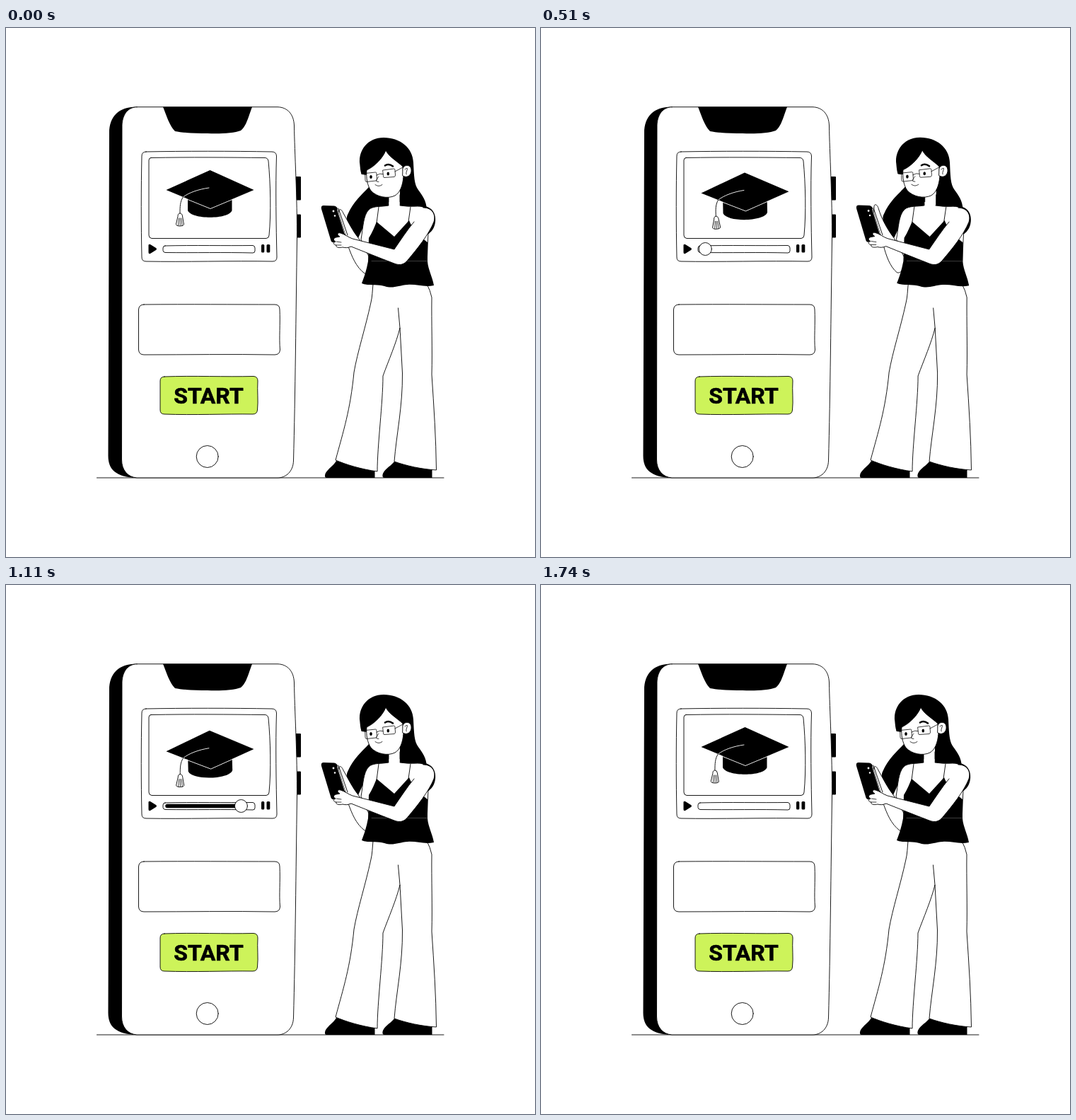
Write an HTML page that moves like this. It is 748 px wide and 748 px high and loops after 1770 ms.

```html
<!DOCTYPE html>
<html lang="en">
<head>
<meta charset="utf-8">
<title>Online course</title>
<style>
  html, body { margin: 0; width: 100%; height: 100%; overflow: hidden; background: #fff; }
  svg { display: block; width: 100vw; height: 100vh; }
  .ink { fill: #000; stroke: none; }
  .line { fill: none; }
  .fine { stroke-width: .75; }
  text { font: 700 32px Roboto, Arial, sans-serif; fill: #000; stroke-width: .6; text-anchor: middle; }
</style>
</head>
<body>
<svg viewBox="0 0 748 748" fill="#fff" stroke="#000" stroke-width=".9" stroke-linecap="round" stroke-linejoin="round">
  <path class="line" d="M128.500 636H619"/>

  <g id="device">
    <path class="ink" d="M185 111.500C160 111 146 125 146 148L144.500 605C144.500 624 155 635 185 636Z"/>
    <rect class="ink" x="409" y="210" width="8" height="33.500" rx="1"/>
    <rect class="ink" x="411" y="263.500" width="6" height="33" rx="1"/>
    <path d="M185 111.700H384C398 112 407 122 407.500 138C408 175 412 240 411.500 300C410 400 409 520 406.500 612C406 627 396 636 384 636H185C172 635 163.500 625 163.500 610L164 137C165 121 173 112 185 111.700Z"/>
    <path class="ink" d="M222 111.500H348L345 120C341 132 338 140 332 145C322 149 300 150 285 149C268 149 248 148 239 146C231 138 227 124 222 111.500Z"/>
    <path d="M198 175C250 174 320 174 376 175Q382 175 382.500 181C381 225 382 280 383 324Q383 330 377 330C320 329 250 331 198 330Q192 330 192 324C191 280 191 225 192 181Q192 175 198 175Z"/>
    <path d="M205 183.500C260 182.500 315 183 366 183.500Q370 183.500 371 188C374 220 375 262 372 293Q372 297 368 297.500H206Q202 297 202 293V187Q202 183.500 205 183.500Z"/>
    <path class="ink" d="M201.500 307Q202 305 204 306L212 311Q214 312.500 212 314L204 319Q201.500 320 201.500 317Z"/>
    <rect class="ink" x="361" y="306" width="4.300" height="11.500" rx="1.500"/>
    <rect class="ink" x="368.500" y="306" width="4.800" height="11.500" rx="1.500"/>
    <path d="M225 308C265 307 310 308 349 307.500Q352 308 352 311V315Q352 318 349 318C310 317 265 318 225 317.500Q222 317 222 314.500V311Q222 308 225 308Z"/>
    <path d="M195 391C260 390.500 320 391 380 391Q387 391 387 398C388 418 386 438 387.500 455Q387 462 380 462C320 461 255 462 195 462Q188 462 187.500 455V398Q188 391 195 391Z"/>
    <circle cx="284.700" cy="606" r="15.500"/>
  </g>

  <g id="progress">
    <path id="fill" class="line" stroke-width="5.500"/>
    <circle id="knob" cy="312.500"/>
  </g>

  <g id="cap">
    <path class="ink" d="M257 241V258C262 271 315 271 319.500 258V241Z"/>
    <path class="ink" d="M288.500 201L350.500 229L289 255L226.500 229Z"/>
    <path class="line" stroke="#fff" d="M257 242.500L289 255.500L320 242.500"/>
    <path class="line" stroke="#fff" d="M287 226C272 228 258 233 250.500 239"/>
    <g id="tassel">
      <path class="line" d="M250.500 239C246 245 246 253 246 262"/>
      <path d="M243 266Q243 262 246 262T249.500 266L251.500 278Q251 280 246 280T240.500 278Z"/>
      <path class="line fine" d="M244.500 269L243.500 279M246.200 269V279M248 269L249 279"/>
    </g>
  </g>

  <g id="button">
    <path fill="#cdf35a" d="M224 493C265 491.500 310 493.500 350 492.500Q356 493 356 499C355 513 357 527 355.500 540Q355 546 349 546C310 545.500 265 547.500 224 546Q218 546 218 540V499Q218 493 224 493Z"/>
    <text x="286.500" y="531">START</text>
  </g>

  <g id="legs">
    <path class="ink" d="M451 634C450 626 463 620 467 612L521.500 625V636H453Q451 636 451 634Z"/>
    <path class="ink" d="M532.500 634C532 625 544 620 549 613L602.500 623V636H535Q532.500 636 532.500 634Z"/>
    <path d="M519 362C518 372 518 380 516 388C508 425 497 458 492 487C487 540 477 570 466 611C480 617 502 624 525 627C525 590 533 530 533 492C541 470 552 445 557 424L560.500 488C561 535 552 575 549 613C566 619 588 624 608.500 625C608 580 605 535 602 490C603 455 601.500 415 602 381Q600 371 595 362Z"/>
    <path class="line" d="M554.500 396L557 424"/>
  </g>

  <g id="torso">
    <g id="head">
      <path class="ink" d="M534 155C512 155 499 172 500 190C501 198 501 203 503 207L514 208V224C505 234 492 244 484 262C480 269 482 274 486 282C489 288 492 292 498 297L514 262L545 270H575L595 256C594 244 589 237 583 229C577 221 577 209 576 190C575 169 557 155 534 155Z"/>
      <path stroke="none" d="M541 230V266H557V230Z"/>
      <path class="line" d="M541 236V252M557 236V252"/>
      <path d="M537 173C533 184 521 196 510 201C509 212 511 223 516 230C524 239 540 242 550 237C557 233 561 223 562 210L561 196C554 189 541 182 537 173Z"/>
      <path d="M561 199C562 193 572 192 573 200C574 208 567 213 561 209Z"/>
      <path class="line fine" d="M564 200Q569 196 567 201T566 207"/>
      <path class="line" stroke-width="2.600" d="M536 194.500Q541 191 547 195.500"/>
      <path class="line fine" d="M508 205.500L522.500 204Q524 204 524 206L524.500 214Q524.500 215.500 523 216L510 217.500Q508 217.500 508 215.500ZM533 201L548.500 199Q550 199 550 201L550.500 208Q550.500 210 549 210.500L535 211.500Q533.500 211.500 533.500 210ZM524 208Q529 205 533 206.500M550 203L562 196.500M502.500 206L508 207"/>
      <g class="eyes"><ellipse class="ink" cx="516" cy="210.500" rx="1.800" ry="2.600"/></g>
      <g class="eyes"><ellipse class="ink" cx="540.300" cy="206" rx="1.800" ry="2.600"/></g>
      <path class="line fine" d="M527 210C525 213 523 215 524 217L527 217.500M522 221.500Q527 225.500 532 221.500"/>
    </g>

    <path class="ink" d="M592 252C604 254 608 264 607 274C606 283 602 288 594 294Z"/>
    <path d="M541 251C532 253 519 251 513 257C505 265 505 282 502 299L516 335H595L596.500 300L598 268C598 256 592 252 582 252Q568 253 557 251"/>
    <path stroke="none" d="M541.600 246H556.500V255H541.600Z"/>
    <path class="line" d="M527 253L524 276M572 253L569 274"/>

    <path id="farArm"/>

    <path class="ink" d="M513 297C518 289 521 281 524 274L549 295L570 272C574 282 580 290 587 296L596 303V330C597 342 603 352 605 364C592 367 580 362 568 363C555 364 547 369 535 365C525 362 512 365 503 361C507 351 510 341 512 330Z"/>
    <path class="line" stroke="#444" d="M517 329.500H595"/>

    <g id="nearArm">
      <path class="line" d="M470 255L483 293"/>
      <path class="ink" d="M449 251L464 251.500Q468 252 469 256L480.500 293Q481 297 476 299L464 303Q460 304 459 299L446 256Q445 251 449 251Z"/>
      <path class="line fine" stroke="#fff" d="M468.500 257L479 291"/>
      <circle cx="463" cy="259" r="1.400" stroke="none"/>
      <circle cx="465" cy="265.500" r="1.200" stroke="none"/>
      <path d="M590 254C603 254 608 264 605 274C598 292 580 314 569 327C563 335 557 336 549 333C528 325 508 317 488 309C483 311 480 311 476 310C472 311 466 311 467 307C463 307 462 303 466 302C463 301 462 297 467 296L472 295C467 292 469 289 473 290C480 292 484 296 490 298L549 313C558 300 567 286 577 274"/>
      <path class="line fine" d="M467 302L474 303M467 307H474"/>
    </g>
  </g>
</svg>

<script>
const LOOP = 1770;
const $ = id => document.getElementById(id);
const eyes = [...document.querySelectorAll('.eyes')];
const eyeSpots = [[516, 210.5], [540.3, 206]];

const armLow = 'M468 272 C469 266 469 262 471 258 C472 255 475 257 477 262 C484 274 490 287 499 298 L516 328 C517 338 511 349 507 347 C495 338 489 323 484 309 Z';
const armHigh = 'M470 272 C473 260 470 252 469 244 C468 238 474 238 475 244 C475 264 489 284 499 298 L514 328 C512 340 504 348 496 344 C489 336 486 322 484 309 Z';

const ease = p => (1 - Math.cos(Math.PI * p)) / 2;

// Eased value from [time, value] steps
function track(steps, t) {
  let [t0, v0] = steps[0];
  if (t <= t0) return v0;
  for (const [t1, v1] of steps) {
    if (t < t1) return v0 + (v1 - v0) * ease((t - t0) / (t1 - t0));
    t0 = t1;
    v0 = v1;
  }
  return v0;
}

function blend(from, to, p) {
  const ends = to.match(/\d+/g);
  let i = 0;
  return from.replace(/\d+/g, n => (+n + (ends[i++] - n) * p).toFixed(2));
}

const lean = [[0, 0], [180, .85], [360, 1], [450, .9], [610, -.5], [680, -.45], [880, 0]];
const raise = [[20, 0], [150, 1], [430, 1], [570, 0]];
const press = [[520, 1], [630, .855], [780, 1]];
const slide = [[430, 230], [1330, 349]];
const knobSize = [[40, 0], [300, 9], [1460, 9], [1640, 0]];
const fade = [[1500, 1], [1720, 0]];
const blink = [[1430, 1], [1490, .15], [1560, 1]];

function set(id, attrs) {
  for (const name in attrs) $(id).setAttribute(name, attrs[name]);
}

function draw(t) {
  const k = track(lean, t);
  set('torso', { transform: `rotate(${.7 * k} 555 400)` });
  set('head', { transform: `translate(${1.9 * k} ${-.4 * k})` });
  set('nearArm', { transform: `translate(${-1.5 * Math.abs(k)} 0)` });
  set('legs', { transform: `translate(555 636) skewX(${-.1 * k}) translate(-555 -636)` });
  set('farArm', { d: blend(armLow, armHigh, track(raise, t)) });

  const bob = (1 - Math.cos(2 * Math.PI * t / LOOP)) / 2;
  const swing = -2 * Math.sin(2 * Math.PI * t / LOOP);
  set('cap', { transform: `translate(0 ${5.5 * bob}) rotate(${-1.7 * bob} 289 230)` });
  set('tassel', { transform: `rotate(${swing} 250.5 239)` });

  const s = track(press, t);
  set('button', { transform: `translate(287 519.5) scale(${s}) translate(-287 -519.5)` });

  const x = track(slide, t);
  const r = track(knobSize, t);
  set('knob', { cx: x, r, visibility: r > .1 ? 'visible' : 'hidden' });
  set('fill', {
    d: `M228 312.500H${x}`,
    opacity: track(fade, t),
    visibility: t > 430 ? 'visible' : 'hidden'
  });

  const open = track(blink, t);
  eyes.forEach((eye, i) => {
    const [ex, ey] = eyeSpots[i];
    eye.setAttribute('transform', `translate(${ex} ${ey}) scale(1 ${open}) translate(${-ex} ${-ey})`);
  });
}

const start = performance.now();
function tick() {
  draw((performance.now() - start) % LOOP);
  requestAnimationFrame(tick);
}
tick();
</script>
</body>
</html>
```
